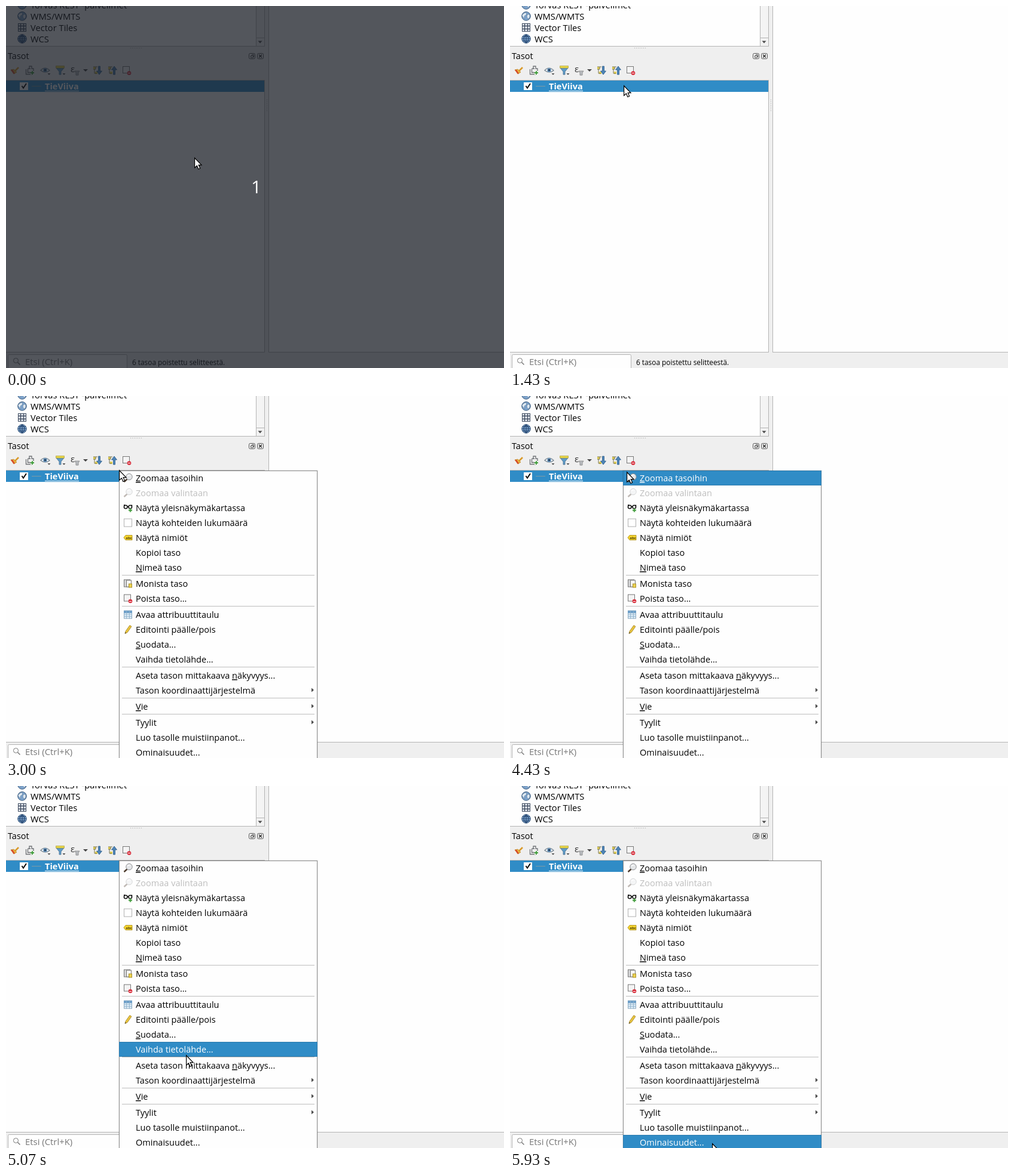
Write an HTML page that moves like this. It is 833 by 607 pixels and loops after 8000 ms.

```html
<!DOCTYPE html>
<html lang="fi">
<head>
<meta charset="utf-8">
<title>Layer menu</title>
<style>
  html, body { margin: 0; width: 100%; height: 100%; overflow: hidden; background: #efefef; }
  svg { display: block; width: 833px; height: 607px; font: 14.5px "Open Sans", "Noto Sans", sans-serif; }
  text { white-space: pre; }
  .crisp { shape-rendering: crispEdges; }
  .accel { text-decoration: underline; text-decoration-thickness: 1px; text-underline-offset: 2px; }
</style>
</head>
<body>
<svg id="stage" viewBox="0 0 833 607" xmlns="http://www.w3.org/2000/svg"></svg>
<script>
const LOOP = 8000, STEP = 70.9, MENU_AT = 3000, COUNTDOWN_END = 70;
const BLUE = '#308cc6', PAPER = '#fefefe', EDGE = '#b4b4b4', INK = '#000';

const rect = (x, y, w, h, fill, more = '') =>
  `<rect class="crisp" x="${x}" y="${y}" width="${w}" height="${h}" fill="${fill}" ${more}/>`;
const box = (x, y, w, h, fill, stroke, more = '') =>
  `<rect x="${x + .5}" y="${y + .5}" width="${w - 1}" height="${h - 1}" fill="${fill}" stroke="${stroke}" ${more}/>`;
const path = (d, fill = 'none', stroke = 'none', width = 1) =>
  `<path d="${d}" fill="${fill}" stroke="${stroke}" stroke-width="${width}"/>`;
const disc = (x, y, r, fill, stroke = 'none') =>
  `<circle cx="${x}" cy="${y}" r="${r}" fill="${fill}" stroke="${stroke}"/>`;
const text = (x, y, s, fill = INK, more = '') => `<text x="${x}" y="${y}" fill="${fill}" ${more}>${s}</text>`;
const at = (x, y, body, more = '') => `<g transform="translate(${x} ${y})" ${more}>${body}</g>`;
const dots = (x, y, dx, dy) =>
  Array.from({ length: 7 }, (_, i) => rect(x + i * dx, y + i * dy, 1, 1, '#a8a8a8')).join('');
const dropArrow = (x, y, r) => path(`M${x - r} ${y}h${2 * r}l${-r} ${r}z`, '#444');

// Icons are drawn around their own centre.
const globe = land => disc(0, 0, 7.3, '#7fa6cf', '#3c5a7c') + (land
  ? path('M-5-4Q-1-7 1-5L0-2-3 0-2 4-5 2-7-1ZM2-3L6-3 6 2 3 5 1 1Z', '#dfe9f2', '#49698c', .6)
  : path('M-7 0H7M-6-3.5H6M-6 3.5H6M0-7V7M0-7Q-8 0 0 7M0-7Q8 0 0 7', 'none', '#20406a', 1.1));
const grid = box(-7, -7, 14, 14, '#e8edf3', '#3d4a5e') +
  path('M-2.5-7V7M2.5-7V7M-7-2.5H7M-7 2.5H7', 'none', '#3d4a5e', 1.3);
const minusBadge = disc(4, 4.5, 3.3, '#d9303e') + rect(2, 4, 4, 1, '#fff');
const removeIcon = box(-7, -7, 12, 12, '#f4f4f4', '#777') + minusBadge;
const plusBadge = rect(1, 1, 6, 6, '#e9f5e6') + path('M4 1V7M1 4H7', 'none', '#3f9b3a', 1.8);
const broom = path('M0 1L6-5', 'none', '#d99b2b', 2.6) + path('M-7-1L-2-2 3 3-2 6Z', '#e8b23c', '#b98322', .7) +
  path('M-7-1L-4-1 0 5-2 6Z', '#d8482e');
const addGroup = path('M-6.5-2V6.5H4M-3.5-2.5V3.5H4M-3.5-3H1M-1-3V-7H3V-3H6V1', 'none', '#6f7276', 1.3) + plusBadge;
const eye = path('M-8 0Q-1-8 7 0 0 6-8 0Z', '#f5f7f9', '#71808c', 1.2) + disc(-.5, -.5, 3.2, '#5b8ab5') +
  disc(-.5, -.5, 1.4, '#1f3146') + dropArrow(6, 5, 2.5);
const funnel = (main, top) => path('M-7-4L-2 2V7L1 7V2L6-4Z', main, '#4b6f8f', .8) +
  path('M-7.500-7.500H6.500V-4H-7.500Z', top, '#a99a32', .7);
const epsilon = text(-8, 3, 'ε', '#333', 'font-size="15"') + path('M-1 1H7L5 4V8H1V4Z', '#b9bcc0', '#777', .7);
const treeArrow = up => rect(-7, -6, 4, 4, '#e6d354') + rect(-4, 2, 4, 4, '#e6d354') +
  path('M-7-6H0M-5-2V5H-1M-7-2H-3V-6', 'none', '#77734f') +
  at(3, 0, path('M-1.500-7H1.500V1H4.500L0 7-4.500 1H-1.500Z', '#4d85b8', '#2e5c8a', .8),
    `style="transform-box:view-box" ${''}`).replace('translate(3 0)', up ? 'translate(3 0) scale(1 -1)' : 'translate(3 0)');
const lens = path('M-6.500 6.500L-1 1.500', 'none', '#4c3b2c', 2.4) + disc(2, -2, 5.2, '#e4e6e8', '#8b8d90') +
  path('M-1-3Q1-6 4-5', 'none', '#fff', 1.3);
const glasses = path('M-7-4L-5-5M6-5L7-3M-1-2H1', 'none', '#111', 1.5) +
  `<g stroke-width="1.5">${disc(-3.8, -1.5, 2.8, '#fff', '#111') + disc(3.8, -1.5, 2.8, '#fff', '#111')}</g>` + plusBadge;
const tag = path('M-7 0L-4-4H7V4H-4Z', '#f3d32f', '#b3941c', .9) +
  text(-3.7, 2.3, 'abc', '#4a3b00', 'font-size="6" font-weight="700"');
const sheets = box(-7, -7, 11, 13, '#d6d7d8', '#777') + box(-3, -6, 9, 12, '#f7f7f5', '#777') + box(1, 0, 6, 7, '#ecd24f', '#a8902d');
const table = box(-7, -7, 14, 14, '#dcebf6', '#8ba9bf') + rect(-7, -7, 14, 4, '#6d9fc8') +
  path('M-7-.5H7M-7 3H7M-2.500-7V7M2.500-7V7', 'none', '#8fb2cc', .9);
const pencil = path('M-5 7L-4 3 3-7 6-5-1 5Z', '#e9c53e', '#9d7b1d', .8) + path('M-5 7L-4.500 4.500-3 5.500Z', '#333');

const items = [
  [138, '&Zoomaa tasoihin', lens], [163, 'Zoomaa valintaan', lens, 'off'],
  [188, 'Näytä yleisnäkymäkartassa', glasses],
  [213, 'Näytä kohteiden lukumäärä', box(-7, -7, 14, 14, '#fff', '#b0b0b0')],
  [238, 'Näytä nimiöt', tag], [263, 'Kopioi taso'], [288, '&Nimeä taso'],
  [315, 'Monista taso', sheets], [340, 'Poista taso...', removeIcon],
  [367, 'Avaa attribuuttitaulu', table], [392, 'Editointi päälle/pois', pencil],
  [417, '&Suodata...'], [442, 'Vaihda tietolähde...'],
  [469, 'Aseta tason mittakaava &näkyvyys...'], [494, 'Tason koordinaattijärjestelmä', '', 'sub'],
  [521, '&Vie', '', 'sub'], [548, 'Tyylit', '', 'sub'],
  [573, 'Luo tasolle muistiinpanot...'], [598, 'Ominaisuudet...']
].map(([y, label, icon = '', kind = '']) => ({ y, label, icon, kind }));

const accel = s => s.replace(/&(.)/, '<tspan class="accel">$1</tspan>');
const menuItem = ({ y, label, icon, kind }) =>
  at(204, y - .5, icon, kind === 'off' ? 'opacity=".35"' : '') +
  text(217, y + 5, accel(label), kind === 'off' ? '#bebebe' : INK, 'class="label"') +
  (kind === 'sub' ? path(`M511 ${y - 4.500}v7l4-3.500z`, '#4d4d4d') : '');

const treePanel =
  rect(0, 0, 433, 68, EDGE) + rect(0, 0, 418, 67, PAPER) +
  rect(419, 0, 13, 53, '#f4f4f4') + rect(419, 54, 13, 13, '#f2f2f2') + path('M421.500 58.500h7l-3.500 4z', '#4a4a4a') +
  [['Torvas REST -palvelimet', globe(true)], ['WMS/WMTS', globe(true)], ['Vector Tiles', grid], ['WCS', globe(false)]]
    .map(([s, icon], i) => at(27, -2 + 19 * i, icon) + text(41, 4 + 19 * i, s, INK, 'font-size="14.700"')).join('');

const toolbar = [[15, broom], [40, addGroup], [66, eye],
  [91, funnel('#5e9bc9', '#ead94c') + dropArrow(6, 5, 2.5)], [116, epsilon],
  [153, treeArrow(false)], [178, treeArrow(true)], [202, removeIcon]]
  .map(([x, icon]) => at(x, 108, icon)).join('') + dropArrow(133, 106, 4);

const layerPanel =
  dots(208, 70, 3, 0) + text(3, 89, 'Tasot') +
  box(406, 79, 11, 10, '#efefef', '#555', 'rx="2"') + path('M409.500 83.500h4v3h-4zM411.500 83V81.500h3v4H414', 'none', '#444', .9) +
  box(420, 79, 11, 10, '#efefef', '#555', 'rx="2"') + path('M423 81.500l5 5m0-5l-5 5', 'none', '#333', 1.5) +
  toolbar +
  rect(0, 124, 433, 457, EDGE) + rect(0, 125, 432, 455, PAPER) + rect(0, 125, 432, 19, BLUE) +
  rect(23, 128, 14, 13, '#fff') + path('M26.500 134l2.500 3.500 5-7.500', 'none', INK, 1.9) +
  rect(43, 134, 16, 1, '#7d9aa5') +
  text(65, 140, 'TieViiva', '#fff', 'font-weight="700"') + rect(65, 142, 57, 1, '#fff');

const statusBar =
  box(3, 584, 200, 30, PAPER, EDGE, 'rx="2"') +
  disc(16.500, 594.500, 4, 'none', '#777') + path('M19.500 597.500l4 4', 'none', '#777', 1.5) +
  text(32, 602, 'Etsi (Ctrl+K)', '#787878', 'font-size="14.900"') +
  text(211, 602, '6 tasoa poistettu selitteestä.', INK, 'font-size="11.850"');

const menu = `<g id="menu">` +
  rect(188, 124, 334, 490, '#000', 'opacity=".08"') + box(189, 125, 332, 490, PAPER, '#8e8e8e') +
  [300, 352, 454, 506, 533].map(y => rect(194, y, 322, 1, '#bdbdbd')).join('') +
  `<g id="bar">${box(189, 0, 332, 25, BLUE, '#2a7aad')}</g>` + items.map(menuItem).join('') + '</g>';

const countdown = `<g id="countdown">` + rect(0, 0, 833, 607, '#1a1e26', 'opacity=".75"') +
  text(410, 314, '1', '#fff', 'font-size="30"') + '</g>';

const cursorShape = `<g id="cursor">` +
  path('M.6 .8V17.200L4.400 13.800 6.900 19.500 9.700 18.300 7.200 12.700H12Z', '#fff', INK, 1.2) + '</g>';

document.getElementById('stage').innerHTML =
  rect(0, 0, 833, 607, '#efefef') + rect(439, 0, 394, 581, EDGE) + rect(440, 0, 393, 580, PAPER) +
  dots(436, 157, 0, 3) + treePanel + layerPanel + statusBar + menu + countdown + cursorShape;

const [menuEl, barEl, countdownEl, cursorEl] =
  ['menu', 'bar', 'countdown', 'cursor'].map(id => document.getElementById(id));
const labels = [...document.querySelectorAll('.label')];

// Pointer way points: time, x, y, easing strength of the stretch leading there.
const way = [
  [0, 315, 254, 0], [789, 315, 254, 0], [1430, 190, 133, 1], [1570, 190, 128, 0],
  [1639, 190, 128, 0], [2000, 184, 118, 1], [2139, 184, 118, 0], [2500, 189, 124, 1],
  [4359, 189, 124, 0], [4430, 195, 127, 0], [5070, 301, 451, .5], [5210, 312, 488, 0],
  [5930, 338, 599, .6], [LOOP, 338, 599, 0]
];
const moveStarts = [0, 860, 1710, 2210, 4430, 5290];

function pointer(time) {
  const start = moveStarts.filter(s => s <= time).pop();
  const t = start + Math.floor((time - start) / STEP) * STEP;
  const i = way.findIndex(w => w[0] > t);
  const [t0, x0, y0] = way[i - 1], [t1, x1, y1, ease] = way[i];
  const p = (t - t0) / (t1 - t0);
  const q = p + ease * (p * p * (3 - 2 * p) - p);
  return [Math.round(x0 + (x1 - x0) * q), Math.round(y0 + (y1 - y0) * q)];
}

function render(time) {
  const [x, y] = pointer(time);
  const open = time >= MENU_AT;
  const active = open && x > 189 ? items.findIndex(m => m.kind !== 'off' && y >= m.y - 13 && y < m.y + 12) : -1;
  cursorEl.setAttribute('transform', `translate(${x} ${y})`);
  countdownEl.style.display = time < COUNTDOWN_END ? '' : 'none';
  menuEl.style.display = open ? '' : 'none';
  barEl.style.display = active < 0 ? 'none' : '';
  if (active >= 0) barEl.setAttribute('transform', `translate(0 ${items[active].y - 13})`);
  labels.forEach((el, i) => el.setAttribute('fill',
    i === active ? '#fff' : items[i].kind === 'off' ? '#bebebe' : INK));
}

const began = performance.now();
function tick() {
  render((performance.now() - began) % LOOP);
  requestAnimationFrame(tick);
}
tick();
</script>
</body>
</html>
```
